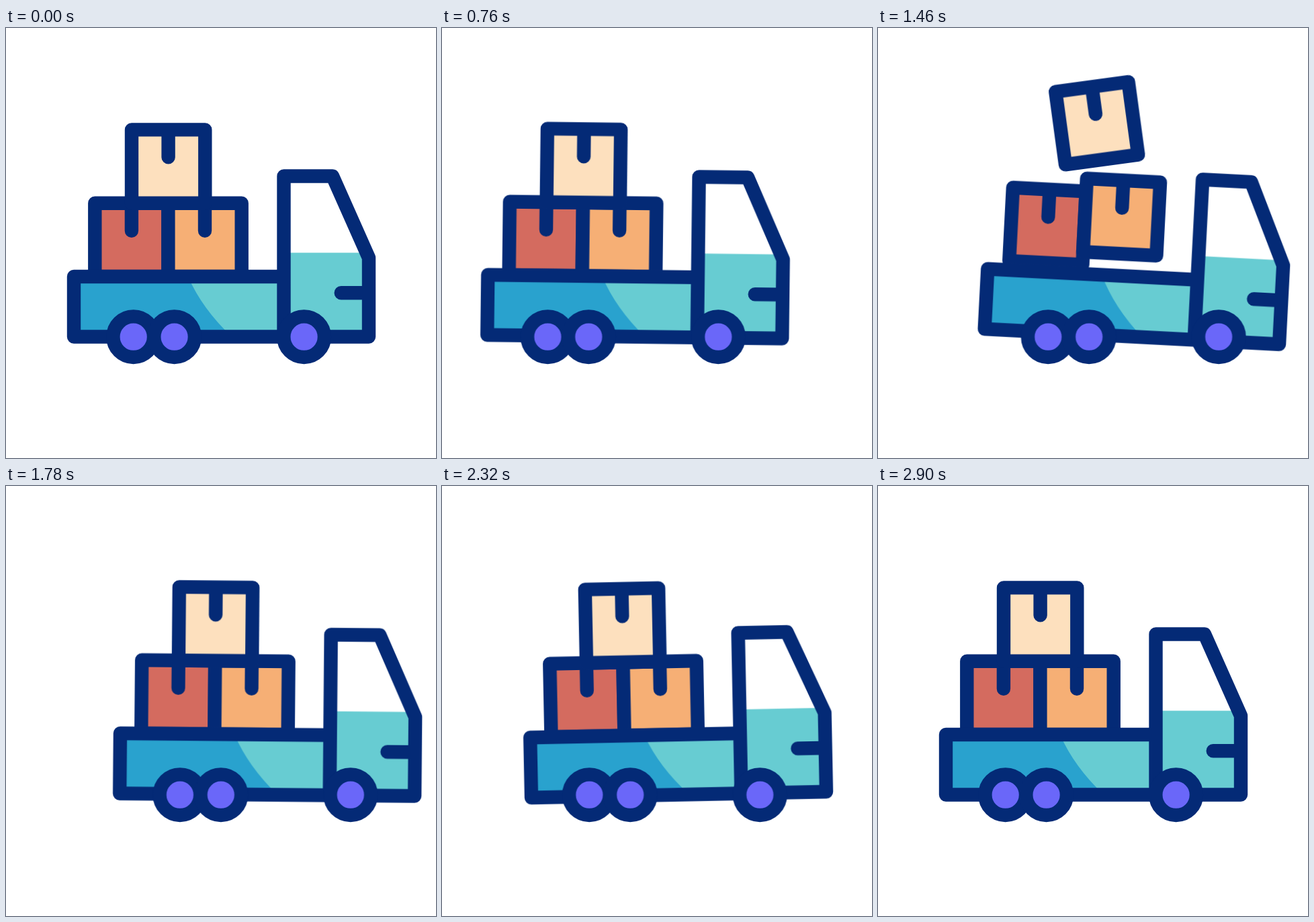
Animation, 640 px wide and 640 px high, one loop 3600 ms. Source, as an HTML page without scripts:

```html
<!DOCTYPE html>
<html lang="en">
<head>
<meta charset="utf-8">
<title>Delivery truck</title>
<style>
  html, body { margin: 0; width: 100%; height: 100%; overflow: hidden; background: #fff; }
  svg { display: block; width: 100%; height: 100%; }

  g { animation: 3.6s cubic-bezier(.333, 0, .667, 1) infinite; }
  .line { fill: none; stroke: #042a76; stroke-width: 20.4; stroke-linecap: round; stroke-linejoin: round; }
  .teal { fill: #67ccd2; }
  .blue { fill: #29a2ce; }
  .hub { fill: #6a67f9; stroke: #042a76; stroke-width: 20.4; }

  .drive { animation-name: drive; }
  .dip { animation-name: dip; }
  .tilt { animation-name: tilt; transform-origin: 320.5px 340px; }
  .box { animation-name: hop; }
  .red { --lift: -18px; --turn: 0deg; fill: #d46b5f; }
  .orange { --lift: -43.5px; --turn: 0deg; fill: #f6af75; }
  .cream { --lift: -81px; --turn: -14.2deg; fill: #fde0be; transform-origin: 241.5px 206px; }
  .drift { animation-name: drift; }

  /* reverse, pull forward, roll on, return */
  @keyframes drive {
    0% { transform: translateX(0); }
    14.8% { transform: translateX(-52px); animation-timing-function: cubic-bezier(.333, .12, .667, .45); }
    31.94% { transform: translateX(37.5px); animation-timing-function: cubic-bezier(.33, .38, .67, .88); }
    45.56% { transform: translateX(72.7px); animation-timing-function: cubic-bezier(.265, 0, .667, 1); }
    80.56%, 100% { transform: translateX(0); }
  }
  @keyframes dip {
    0%, 24.44% { transform: translateY(0); }
    33.06% { transform: translateY(23px); }
    38.89%, 100% { transform: translateY(0); }
  }
  @keyframes tilt {
    0%, 17.22% { transform: rotate(0deg); }
    32.42% { transform: rotate(4.1deg); }
    60.19% { transform: rotate(-1.3deg); }
    80.56%, 100% { transform: rotate(0deg); }
  }
  @keyframes hop {
    0%, 24.72% { transform: translateY(0) rotate(0deg); }
    36.81% { transform: translateY(var(--lift)) rotate(var(--turn)); animation-timing-function: cubic-bezier(.42, 0, .667, 1); }
    47.22%, 100% { transform: translateY(0) rotate(0deg); }
  }
  @keyframes drift {
    0%, 31.67% { transform: translateX(0); }
    39.44% { transform: translateX(11px); }
    47.22%, 100% { transform: translateX(0); }
  }
</style>
</head>
<body>
<svg viewBox="0 0 640 640">
  <defs>
    <g id="crate">
      <path d="M0 0H109.3V109.3H0Z"/>
      <path class="line" d="M0 0H109.3V109.3H0ZM54.6 0V41"/>
    </g>
    <circle id="wheel" class="hub" r="30.3" cy="459.7"/>
  </defs>
  <g class="drive">
    <g class="dip">
      <g class="tilt">
        <g class="box red"><use href="#crate" x="132.3" y="260.7"/></g>
        <g class="box orange"><use href="#crate" x="241.4" y="260.7"/></g>
        <g class="drift">
          <g class="box cream"><use href="#crate" x="187" y="151.4"/></g>
        </g>
        <path class="teal" d="M101 370H413.5V334.5H536.7L540 342V459.5H101Z"/>
        <path class="blue" d="M101 370H271Q292 418 336 459.5H101Z"/>
        <path class="line" d="M413.5 370H101V459.5H540V342L486 220.5H413.5V459.5M498.7 394.3H540"/>
      </g>
      <use href="#wheel" x="189.7"/>
      <use href="#wheel" x="250.6"/>
      <use href="#wheel" x="443.6"/>
    </g>
  </g>
</svg>
</body>
</html>
```
